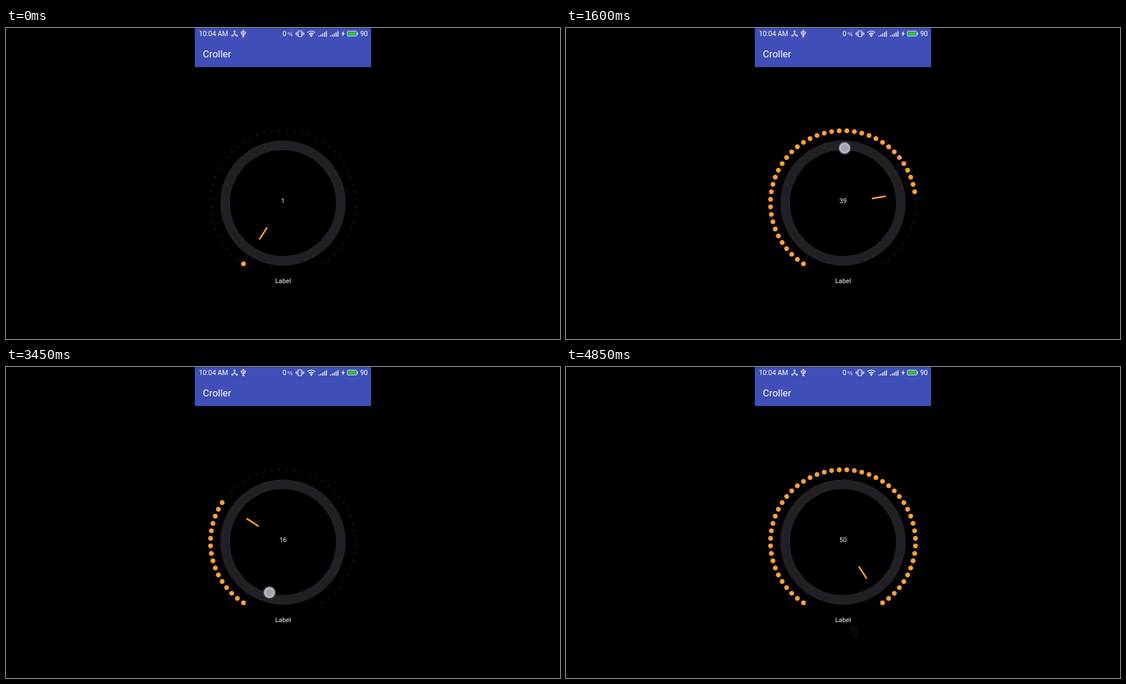
An HTML page that plays this animation: 960 px wide and 540 px high, repeating every 5 s.

```html
<!DOCTYPE html>
<html lang="en">
<head>
<meta charset="utf-8">
<title>Croller</title>
<style>
  html, body { margin: 0; width: 100%; height: 100%; overflow: hidden; background: #000; }
  svg { display: block; width: 960px; height: 540px; font-family: Roboto, sans-serif; fill: #fff; }
  .line { fill: none; stroke: #fff; }
</style>
</head>
<body>
<svg viewBox="0 0 960 540">
  <defs>
    <radialGradient id="glow">
      <stop offset="0" stop-color="#9f9ca2"/>
      <stop offset=".45" stop-color="#aaa8ae"/>
      <stop offset=".64" stop-color="#c0bec9"/>
      <stop offset=".72" stop-color="#8d8998"/>
      <stop offset=".79" stop-color="#3f3a50" stop-opacity=".9"/>
      <stop offset="1" stop-color="#2a2540" stop-opacity="0"/>
    </radialGradient>
    <path id="signal" d="M0 15v-2m3.2 2v-3.8m3.2 3.8v-5.6m3.2 5.6v-7.6m3.2 7.6v-9.6" stroke-width="1.5"/>
  </defs>

  <rect x="327.2" y=".3" width="305.4" height="67.5" fill="#3f4fb7"/>
  <g font-size="11.9">
    <text x="334.3" y="14">10:04 AM</text>
    <text x="479.3" y="14">0</text>
    <text x="613.7" y="14">90</text>
  </g>
  <text x="488" y="10.5" font-size="6">K</text>
  <text x="493.3" y="14" font-size="6.5">s</text>
  <path class="line" d="M490.8 13.5l4-7" stroke-width=".7"/>

  <!-- hub and USB -->
  <path class="line" d="M396 5.5v5l-4 3m4-3l4 3" stroke-width="1.2"/>
  <circle cx="396" cy="6" r="1.5"/><circle cx="392" cy="13.3" r="1.5"/><circle cx="400" cy="13.3" r="1.5"/>
  <path class="line" d="M411.3 5v9m-3.1-6.5v2.6l3.1 2 3.1-2v-2.6" stroke-width="1.2"/>
  <path d="M409.3 6l2-3.2 2 3.2zM407 6.3h2.4v2.2h-2.4zm6.2 0h2.4v2.2h-2.4z"/>
  <circle cx="411.3" cy="14.4" r="1.6"/>

  <!-- vibrate and Wi-Fi -->
  <path class="line" d="M506.3 5h6v10h-6zm-2.1 1.8v6.4m10.2-6.4v6.4m-12.1-4.9v3.4m14-3.4v3.4" stroke-width="1.1"/>
  <path class="line" d="M522.4 8a9.6 9.6 0 0 1 13.2 0m-11 2.4a6.5 6.5 0 0 1 8.8 0m-6.7 2.2a3.5 3.5 0 0 1 4.6 0" stroke-width="1.4"/>
  <circle cx="529" cy="14.3" r="1.3"/>

  <!-- reception and battery -->
  <use class="line" href="#signal" x="542.5"/>
  <use class="line" href="#signal" x="562.5"/>
  <path d="M585.5 4.8l-4.3 5.8h2.8l-1.2 4.4 4.5-6h-2.9z"/>
  <rect class="line" x="591.6" y="5.6" width="16.2" height="8.4" rx="1.2"/>
  <rect x="593.2" y="7.1" width="13" height="5.4" fill="#22d01c"/>
  <path d="M608.3 8h1.5v3.6h-1.5z"/>

  <text x="341.1" y="50.8" font-size="16.95">Croller</text>

  <circle cx="480" cy="304" r="100.3" fill="none" stroke="#222024" stroke-width="16.8"/>
  <g id="dots"></g>
  <path id="pointer" stroke="#ffa03a" stroke-width="2.8"/>
  <g font-size="11.3" text-anchor="middle">
    <text id="count" x="480" y="304"></text>
    <text x="480.1" y="442.5">Label</text>
  </g>
  <circle id="touch" r="13" fill="url(#glow)"/>
</svg>
<script>
  const LOOP = 5000, STEP = 50, LAST = 4850, MAX = 50;
  const $ = id => document.getElementById(id);
  const clamp = (v, low, high) => Math.min(Math.max(v, low), high);

  // Where each stroke of the finger ends; angles run clockwise from the bottom.
  const strokes = [
    { time: 0, level: 1, angle: -60, reach: 92 },
    { time: 250, level: 2.9, angle: -53, reach: 88 },
    { time: 2070, level: 46.2, angle: 225, reach: 97 },
    { time: 2700, level: 22, angle: 55, reach: 76 },
    { time: 3250, level: 13, angle: -4, reach: 91 },
    { time: 3850, level: 26, angle: 72, reach: 90 },
    { time: 4250, level: 50, angle: 261.6, reach: 89 },
    { time: 4490, level: 50, angle: 353, reach: 157 }
  ];

  function pose(t) {
    const next = strokes.findIndex(s => s.time > t);
    if (next < 0) return strokes.at(-1);
    const a = strokes[next - 1], b = strokes[next];
    const p = (t - a.time) / (b.time - a.time);
    const ease = (1 - Math.cos(Math.PI * p)) / 2;
    const mix = key => a[key] + (b[key] - a[key]) * ease;
    return { level: mix('level'), angle: mix('angle'), reach: mix('reach') };
  }

  function polar(deg, r) {
    const a = deg * Math.PI / 180;
    return [480 - r * Math.sin(a), 304 + r * Math.cos(a)];
  }

  const dialAngle = value => 27 + 6 * value;

  function place(circle, deg, r) {
    const [x, y] = polar(deg, r);
    circle.setAttribute('cx', x);
    circle.setAttribute('cy', y);
  }

  const dots = Array.from({ length: MAX }, (_, i) => {
    const dot = document.createElementNS('http://www.w3.org/2000/svg', 'circle');
    place(dot, dialAngle(i + 1), 125.7);
    return $('dots').appendChild(dot);
  });

  function draw(now) {
    const t = Math.min(Math.floor(now % LOOP / STEP) * STEP, LAST);
    const { level, angle, reach } = pose(t);
    const value = Math.round(level);
    dots.forEach((dot, i) => {
      const on = i < value;
      dot.setAttribute('r', on ? 4.2 : 2);
      dot.setAttribute('fill', on ? '#ffa03a' : '#121212');
    });
    const dial = dialAngle(value);
    $('pointer').setAttribute('d', `M${polar(dial, 50.5)}L${polar(dial, 75.3)}`);
    $('count').textContent = value;
    place($('touch'), angle, reach);
    $('touch').setAttribute('opacity', t < 150 ? 0 : clamp((4800 - t) / 200, .035, 1));
  }

  const start = performance.now();
  function tick() {
    draw(performance.now() - start);
    requestAnimationFrame(tick);
  }
  tick();
</script>
</body>
</html>
```
